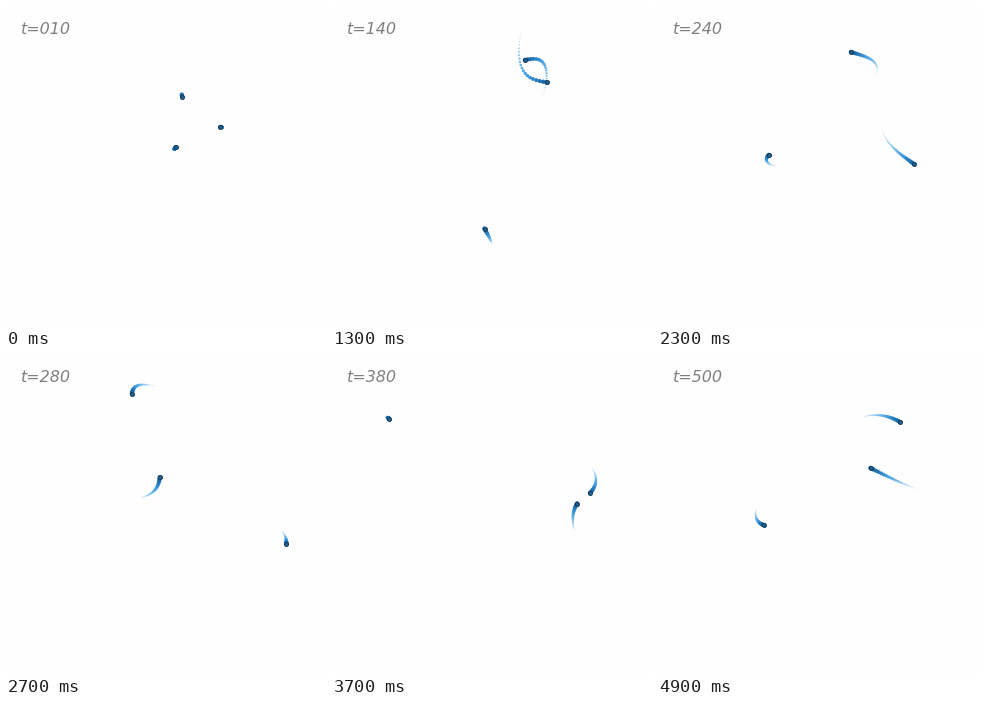
A matplotlib script that plays this animation: 320 by 320 pixels, repeating every 5 s.

```python
import numpy as np
import matplotlib.pyplot as plt
from matplotlib.animation import FuncAnimation
from matplotlib.colors import LinearSegmentedColormap

SIZE, DPI = 320, 100
FRAMES, INTERVAL = 50, 100
PX = 72 / DPI                        # points per pixel
TRAIL_STEPS, STEPS_PER_FRAME = 20, 10
POSITION_SUM = np.array([560, 353])  # equal masses around a fixed centre

# Turning points and close passes: time in frames, then x, y of two bodies.
# The third body always balances the other two.
KEYS = np.array([
    (-.45, 168.3, 143.2, 216, 121.3),
    (4, 218, 46, 151, 109),
    (6, 215.5, 18.5, 164.2, 108),
    (9, 202.5, 12, 189.5, 101.5),
    (11, 189, 27, 211, 89),
    (12.5, 198, 71.5, 206.5, 53.5),
    (13, 214.5, 76.3, 193, 54),
    (16, 241, 70, 172, 93.5),
    (19, 228, 73, 160, 149),
    (21, 224, 124, 118, 160),
    (23, 256, 158, 111, 149),
    (28.3, 279.5, 196, 145, 86),
    (29, 279, 199, 131, 59),
    (31, 272, 205, 96, 50),
    (37, 245, 149.5, 57, 64.5),
    (40, 281, 121.5, 83, 82),
    (42, 290.5, 129, 111, 106),
    (47, 257.5, 134.5, 204.5, 63),
    (49, 212.5, 114, 242, 68)])
KNOTS, POINTS = KEYS[:, 0], KEYS[:, 1:]


def spline_velocities(knots, points):
    """Velocities of a smooth spline that starts at rest."""
    h = np.diff(knots)
    chord = np.diff(points, axis=0) / h[:, None]
    matrix, rhs = np.eye(len(knots)), np.zeros_like(points)
    for i in range(1, len(knots) - 1):
        matrix[i, i - 1:i + 2] = h[i], 2 * (h[i - 1] + h[i]), h[i - 1]
        rhs[i] = 3 * (h[i] * chord[i - 1] + h[i - 1] * chord[i])
    matrix[-1, -2] = 1
    rhs[-1] = 2 * chord[-1]
    return np.linalg.solve(matrix, rhs)


VELOCITIES = spline_velocities(KNOTS, POINTS)


def positions(times):
    """Positions of all bodies, shaped (time, body, xy)."""
    times = np.clip(times, KNOTS[0], KNOTS[-1])
    i = np.clip(np.searchsorted(KNOTS, times, side="right") - 1, 0, len(KNOTS) - 2)
    span = (KNOTS[i + 1] - KNOTS[i])[:, None]
    u = (times - KNOTS[i])[:, None] / span
    pair = ((1 + 2 * u) * (1 - u) ** 2 * POINTS[i]
            + u * (1 - u) ** 2 * span * VELOCITIES[i]
            + u ** 2 * (3 - 2 * u) * POINTS[i + 1]
            + u ** 2 * (u - 1) * span * VELOCITIES[i + 1])
    a, b = pair[:, :2], pair[:, 2:]
    return np.stack([a, b, POSITION_SUM - a - b], axis=1)


fig = plt.figure(figsize=(SIZE / DPI, SIZE / DPI), dpi=DPI, facecolor="#fefefe")
ax = fig.add_axes([0, 0, 1, 1])
ax.set(xlim=(0, SIZE), ylim=(SIZE, 0))
ax.axis("off")

age = np.arange(TRAIL_STEPS, -1, -1) / STEPS_PER_FRAME
growth = np.repeat(np.linspace(0, 1, TRAIL_STEPS + 1), 3)
blues = LinearSegmentedColormap.from_list(
    "trail", ["#cfe7f9", "#8fc9f2", "#45a0e2", "#12609f"])
hidden = np.zeros_like(growth)
trail = ax.scatter(hidden, hidden, s=((0.9 + 3.6 * growth) * PX) ** 2,
                   c=blues(growth), linewidths=0)
heads = ax.scatter([0] * 3, [0] * 3, s=(4 * PX) ** 2, c="#1f6296",
                   edgecolors="#17384f", linewidths=0.9 * PX, zorder=3)
label = ax.text(15.4, 28, "", fontsize=16 * PX, color="#808080", style="italic",
                family="DejaVu Sans", va="baseline")


def draw(frame):
    path = positions(frame - age)
    trail.set_offsets(path.reshape(-1, 2))
    heads.set_offsets(path[-1])
    label.set_text(f"t={(frame + 1) * STEPS_PER_FRAME:03d}")
    return trail, heads, label


anim = FuncAnimation(fig, draw, frames=FRAMES, interval=INTERVAL,
                     repeat=True, repeat_delay=0)
plt.show()
```
